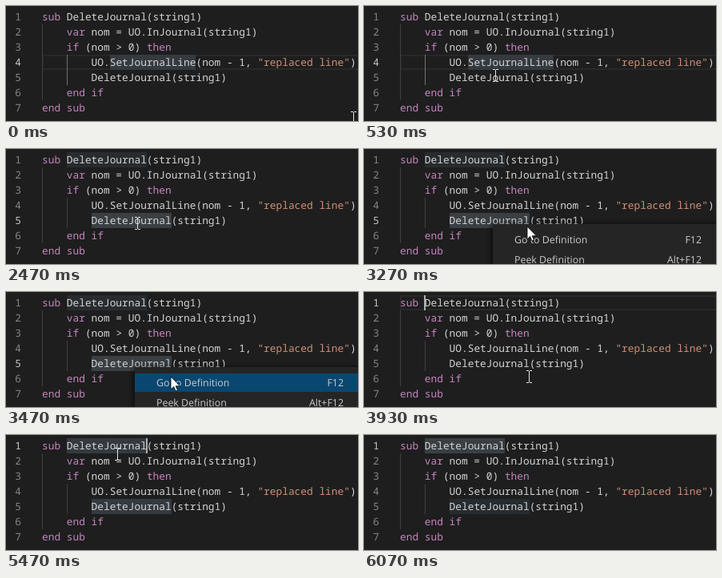
An HTML page that plays this animation: 440 by 144 pixels, repeating every 6.14 s.

```html
<!DOCTYPE html>
<html lang="en">
<head>
<meta charset="utf-8">
<title>Go to definition</title>
<style>
html, body { margin: 0; width: 100%; height: 100%; overflow: hidden; background: #1e1e1e; }
svg { display: block; width: 440px; height: 144px; }
svg * { animation: 6140ms step-end infinite; }
text { white-space: pre; text-rendering: geometricPrecision; }
.code text { font: 12.833px "Noto Sans Mono", "DejaVu Sans Mono", monospace; fill: #d4d4d4; }
.code .num { fill: #858585; }
.key { fill: #c586c0; }
.str { fill: #ce9178; }
.guide { fill: #404040; }

#row { fill: none; stroke: #282828; stroke-width: 2; animation-name: row; }
@keyframes row {
  0% { transform: translateY(61px); opacity: 1; }
  14.16% { transform: translateY(80px); opacity: 1; }
  27.19% { transform: translateY(80px); opacity: 0; }
  64% { transform: translateY(4px); opacity: 1; }
  82.57%, 100% { transform: translateY(4px); opacity: 0; }
}
#inner { animation-name: inner; }
@keyframes inner { 0% { fill: #707070; } 27.19%, 100% { fill: #404040; } }

#n1 { animation-name: n1; }
#n4 { animation-name: n4; }
#n5 { animation-name: n5; }
@keyframes n1 { 0% { fill: #858585; } 64%, 100% { fill: #c6c6c6; } }
@keyframes n4 { 0% { fill: #c6c6c6; } 14.16%, 100% { fill: #858585; } }
@keyframes n5 { 0% { fill: #858585; } 14.16% { fill: #c6c6c6; } 64%, 100% { fill: #858585; } }

/* word highlight, selection, and other match of the selection */
svg { --word: #343a40; --sel: #3a3f44; --match: #272c30; --none: #1e1e1e00; }
#call { fill: var(--word); animation-name: call; }
#decl { animation-name: decl; }
#recur { animation-name: recur; }
@keyframes call { 0% { opacity: 1; } 14.16%, 100% { opacity: 0; } }
@keyframes decl {
  0% { fill: var(--none); }
  17.42% { fill: var(--word); }
  40.22% { fill: var(--match); }
  64% { fill: var(--none); }
  82.57% { fill: var(--word); }
  98.85%, 100% { fill: var(--sel); }
}
@keyframes recur {
  0% { fill: var(--none); }
  17.42% { fill: var(--word); }
  40.22% { fill: var(--sel); }
  64% { fill: var(--none); }
  82.57% { fill: var(--word); }
  98.85%, 100% { fill: var(--match); }
}

#caret { fill: #aeafad; animation-name: caret; }
@keyframes caret {
  0% { transform: translate(159px, 80px); opacity: 0; }
  14.16% { transform: translate(159px, 80px); opacity: 1; }
  21.66% { transform: translate(159px, 80px); opacity: 0; }
  27.19% { transform: translate(206px, 80px); opacity: 1; }
  34.69% { transform: translate(206px, 80px); opacity: 0; }
  64% { transform: translate(75px, 4px); opacity: 1; }
  71.66% { transform: translate(75px, 4px); opacity: 0; }
  79.31% { transform: translate(136px, 4px); opacity: 1; }
  82.57% { transform: translate(175px, 4px); opacity: 1; }
  90.06%, 100% { transform: translate(175px, 4px); opacity: 0; }
}

#menu { animation-name: menu; }
#menu text { font: 12.4px "Open Sans", "Noto Sans", sans-serif; fill: #ccc; }
#menu .hot { text-anchor: end; }
#panel { fill: #252526; filter: drop-shadow(0 2px 4px #000); }
#hover { fill: #094771; animation-name: hover; }
@keyframes menu {
  0% { opacity: 0; }
  43.48% { opacity: .6; }
  44.46% { opacity: 1; }
  64%, 100% { opacity: 0; }
}
@keyframes hover { 0% { opacity: 0; } 54.23% { opacity: 1; } 64%, 100% { opacity: 0; } }

#mouse { animation-name: mouse; }
#beam { fill: none; stroke: #e6e6e6; animation-name: beam; }
#arrow { fill: #fff; stroke: #000; stroke-width: .8; animation-name: arrow; }
@keyframes beam { 0% { opacity: 1; } 48.85% { opacity: 0; } 64% { opacity: 1; } 92.34%, 100% { opacity: 0; } }
@keyframes arrow { 0% { opacity: 0; } 48.85% { opacity: 1; } 64%, 100% { opacity: 0; } }
@keyframes mouse {
  0% { transform: translate(434px, 140px); }
  1.14% { transform: translate(428px, 138px); }
  2.11% { transform: translate(402px, 131px); }
  3.25% { transform: translate(352px, 118px); }
  4.39% { transform: translate(290px, 105px); }
  5.37% { transform: translate(232px, 96px); }
  6.51% { transform: translate(186px, 90px); }
  7.65% { transform: translate(161px, 88px); }
  8.63% { transform: translate(164px, 87px); }
  34.69% { transform: translate(164px, 89px); }
  35.83% { transform: translate(164px, 92px); }
  36.97% { transform: translate(164px, 93px); }
  48.85% { transform: translate(166px, 93px); }
  49.99% { transform: translate(172px, 92px); }
  50.97% { transform: translate(183px, 92px); }
  52.11% { transform: translate(196px, 94px); }
  53.25% { transform: translate(204px, 97px); }
  54.23% { transform: translate(207px, 102px); }
  55.37% { transform: translate(207px, 104px); }
  56.51% { transform: translate(206px, 106px); }
  70.52% { transform: translate(203px, 100px); }
  71.66% { transform: translate(188px, 76px); }
  72.8% { transform: translate(164px, 42px); }
  73.77% { transform: translate(147px, 22px); }
  74.91% { transform: translate(142px, 18px); }
  89.08% { transform: translate(139px, 24px); }
  90.06% { transform: translate(125px, 60px); }
  91.2%, 100% { transform: translate(102px, 131px); }
}
</style>
</head>
<body>
<svg viewBox="0 0 440 144">
  <rect id="row" x="46" y="1" width="400" height="17"/>
  <rect id="call" x="130" y="61" width="107" height="19"/>
  <rect id="decl" x="76" y="4" width="100" height="19"/>
  <rect id="recur" x="107" y="80" width="100" height="19"/>
  <rect class="guide" x="45" y="23" width="1" height="95"/>
  <rect class="guide" id="inner" x="76" y="61" width="1" height="38"/>

  <g class="code">
    <text class="num" id="n1" x="11.3" y="18">1</text>
    <text class="num" x="11.3" y="37">2</text>
    <text class="num" x="11.3" y="56">3</text>
    <text class="num" id="n4" x="11.3" y="75">4</text>
    <text class="num" id="n5" x="11.3" y="94">5</text>
    <text class="num" x="11.3" y="113">6</text>
    <text class="num" x="11.3" y="132">7</text>

    <text x="45" y="18"><tspan class="key">sub</tspan> DeleteJournal(string1)</text>
    <text x="75.8" y="37"><tspan class="key">var</tspan> nom = UO.InJournal(string1)</text>
    <text x="75.8" y="56"><tspan class="key">if</tspan> (nom &gt; 0) <tspan class="key">then</tspan></text>
    <text x="106.6" y="75">UO.SetJournalLine(nom - 1, <tspan class="str">"replaced line"</tspan>)</text>
    <text x="106.6" y="94">DeleteJournal(string1)</text>
    <text class="key" x="75.8" y="113" style="fill:#c586c0">end if</text>
    <text class="key" x="45" y="132" style="fill:#c586c0">end sub</text>
  </g>
  <rect id="caret" width="2" height="19"/>

  <g id="menu">
    <rect id="panel" x="161" y="94" width="300" height="80"/>
    <rect id="hover" x="161" y="102" width="300" height="23"/>
    <text x="188" y="118">Go to Definition</text>
    <text class="hot" x="422" y="118">F12</text>
    <text x="188" y="143">Peek Definition</text>
    <text class="hot" x="422" y="143">Alt+F12</text>
  </g>

  <g id="mouse">
    <path id="beam" d="M-3-7.5H0M1-7.5H4M.5-7V7M-3 7.5H0M1 7.5H4"/>
    <path id="arrow" d="M0 0V16L3.7 12.6L6 18L8.5 17L6.2 11.8H11.4Z"/>
  </g>
</svg>
</body>
</html>
```
